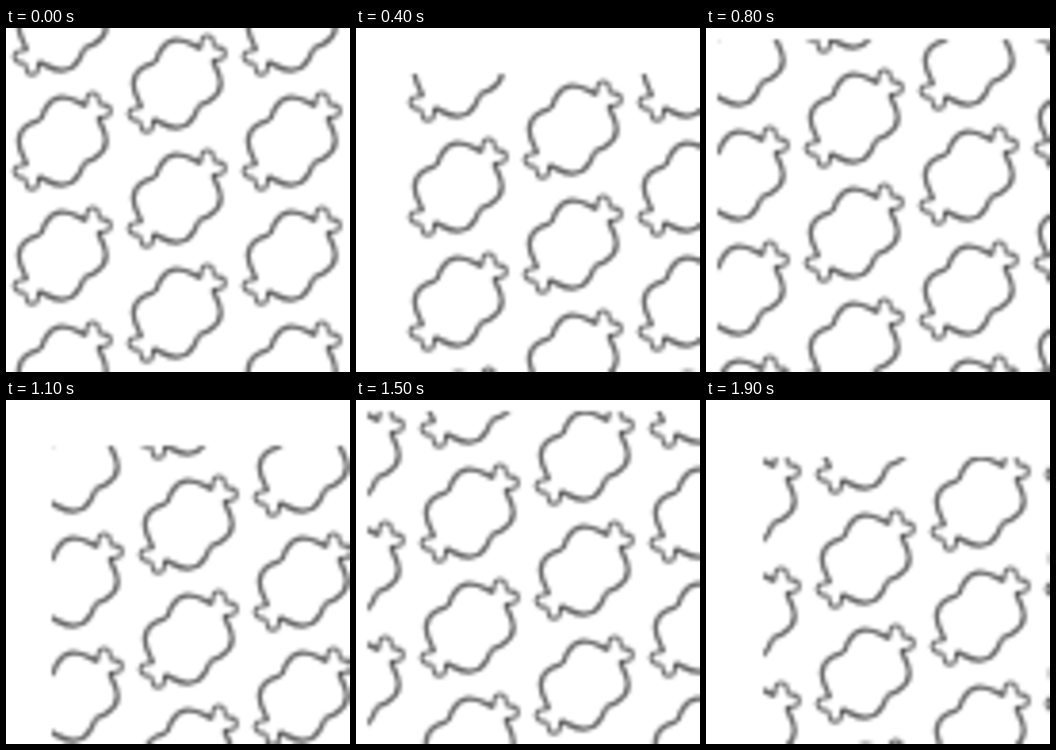
Animation, 748 px wide and 748 px high, one loop 2000 ms. Source, as an HTML page with a canvas:

```html
<!DOCTYPE html>
<html lang="en">
<head>
<meta charset="utf-8">
<title>Drifting outlines</title>
<style>
  html, body { margin: 0; width: 100%; height: 100%; overflow: hidden; background: #fff; }
  canvas { display: block; width: 748px; height: 748px; }
</style>
</head>
<body>
<canvas id="stage" width="748" height="748"></canvas>
<script>
  const SIZE = 748, GRID = 90, SCALE = SIZE / GRID;
  const STEP_MS = 100, STEPS = 20, SWEEP = 7, STRIDE = 3;
  const CENTER = { x: 372 / SCALE, y: 121.5 / SCALE };

  const stage = document.getElementById('stage').getContext('2d');
  const small = document.createElement('canvas');
  small.width = small.height = GRID;
  const pen = small.getContext('2d');

  // One quarter of the body and half of a knob; reflections complete the outline.
  const body = new Path2D('M51,-77 C38,-82 22,-95 0,-95 C-18,-95 -32,-82 -40,-66 C-43,-56 -43,-52 -48.5,-48.5');
  const knob = new Path2D('M51,-77 L53,-92 C53,-101 59,-105 66,-105 C75,-105 79,-99 79,-91 C79,-85 79,-82 81,-81');
  const reflections = [[1, 0, 0, 1], [0, 1, 1, 0], [-1, 0, 0, -1], [0, -1, -1, 0]];

  function joined(part) {
    const whole = new Path2D();
    for (const m of reflections) whole.addPath(part, new DOMMatrix([...m, 0, 0]));
    return whole;
  }
  const bodyOutline = joined(body), knobOutline = joined(knob);

  function drawShape(x, y) {
    pen.save();
    pen.translate(x, y);
    pen.scale(1 / SCALE, 1 / SCALE);
    pen.lineWidth = 1.25 * SCALE;
    pen.strokeStyle = 'rgba(0,0,0,.62)';
    pen.stroke(bodyOutline);
    pen.lineWidth = 1.05 * SCALE;
    pen.strokeStyle = 'rgba(0,0,0,.6)';
    pen.stroke(knobOutline);
    pen.restore();
  }

  function drawStep(step) {
    const edge = step % SWEEP * STRIDE;
    const shift = step * STRIDE;
    pen.fillStyle = '#fff';
    pen.fillRect(0, 0, GRID, GRID);
    pen.save();
    pen.beginPath();
    pen.rect(edge, edge, GRID, GRID);
    pen.clip();
    for (let col = -4; col <= 3; col++) {
      const x = CENTER.x + shift + col * 30;
      const y = (CENTER.y + shift + col * 15) % 30;
      for (let row = -2; row <= 4; row++) drawShape(x, y + row * 30);
    }
    pen.restore();
    stage.imageSmoothingEnabled = true;
    stage.imageSmoothingQuality = 'high';
    stage.drawImage(small, 0, 0, SIZE, SIZE);
  }

  const start = performance.now();
  let shown = -1;
  function tick(now) {
    const step = Math.floor(Math.max(0, now - start) / STEP_MS) % STEPS;
    if (step !== shown) drawStep(shown = step);
    requestAnimationFrame(tick);
  }
  tick(start);
</script>
</body>
</html>
```
